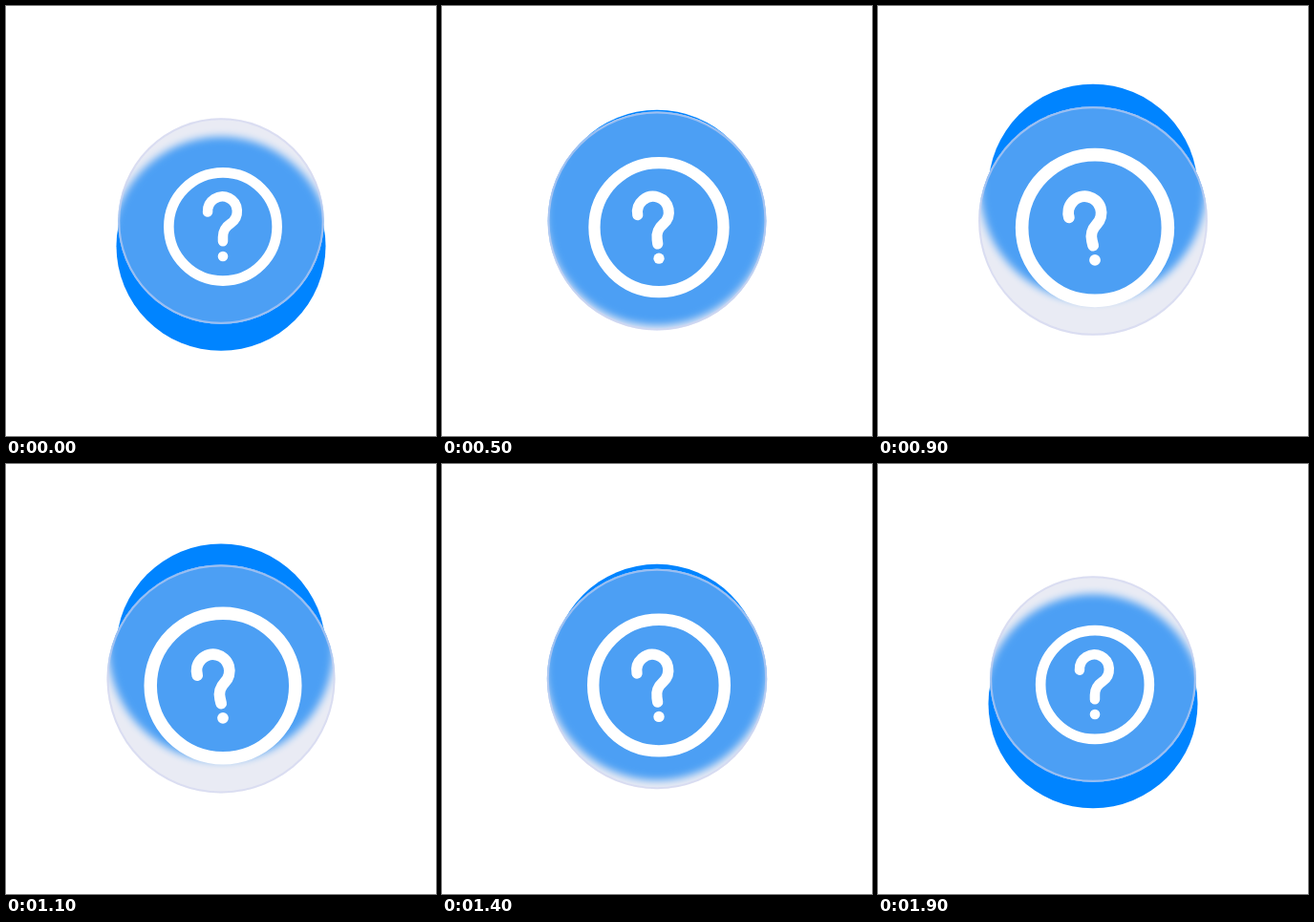
An HTML page that plays this animation: 450 by 450 pixels, repeating every 2000 ms.

```html
<!DOCTYPE html>
<html lang="en">
<head>
<meta charset="utf-8">
<title>Help button</title>
<style>
  html, body { margin: 0; width: 100%; height: 100%; overflow: hidden; background: #fff; }
  svg { display: block; width: 100vw; height: 100vh; }
</style>
</head>
<body>
<svg viewBox="0 0 450 450">
  <defs>
    <clipPath id="lens"><circle class="glass" cx="225" cy="225"/></clipPath>
    <filter id="soft" x="-20%" y="-20%" width="140%" height="140%" color-interpolation-filters="sRGB">
      <feGaussianBlur stdDeviation="4"/>
    </filter>
  </defs>
  <circle id="disc" cx="225" r="109.5" fill="#0084ff"/>
  <g clip-path="url(#lens)">
    <rect width="450" height="450" fill="#fff"/>
    <circle id="blurred" cx="225" fill="#0084ff" filter="url(#soft)"/>
    <rect width="450" height="450" fill="rgb(197,203,226)" fill-opacity=".385"/>
  </g>
  <circle id="rim" cx="225" cy="225" fill="none" stroke="rgb(208,212,240)" stroke-opacity=".6" stroke-width="2"/>
  <circle id="ring" cx="227" fill="none" stroke="#fff"/>
  <path id="hook" d="M-15.4 .8A15.4 15.4 0 1 1 8.5 12.8C3 16.5 .5 20 .5 27V31.5"
        fill="none" stroke="#fff" stroke-width="10.5" stroke-linecap="round" stroke-linejoin="round"/>
  <circle id="dot" cx="227" fill="#fff"/>
</svg>
<script>
const LOOP = 2000, STEP = 100, LEAD = 30;
const $ = id => document.getElementById(id);
const glass = document.querySelector('.glass');
const set = (el, attrs) => {
  for (const name in attrs) el.setAttribute(name, attrs[name]);
};

function draw(time) {
  const t = Math.floor((time % LOOP) / STEP) * STEP + LEAD;
  const p = (1 - Math.cos(2 * Math.PI * t / LOOP)) / 2;
  const mix = (a, b) => a + (b - a) * p;

  const discY = mix(251.5, 190.5);
  const glassR = mix(107.7, 120);
  const ringW = mix(10.6, 13.6);

  set($('disc'), { cy: discY });
  set($('blurred'), { cy: discY, r: mix(114.5, 118) });
  set(glass, { r: glassR });
  set($('rim'), { r: glassR - 1 });
  set($('ring'), { cy: mix(231, 232), r: mix(61.9, 83.4) - ringW / 2, 'stroke-width': ringW });
  set($('hook'), {
    transform: `translate(${mix(226.5, 216.3)} ${mix(214.8, 216.5)}) rotate(${mix(0, -13.5)}) scale(${mix(1, 1.12)})`
  });
  set($('dot'), { cy: mix(262, 266), r: mix(5.3, 5.9) });
}

const start = performance.now();
function tick() {
  draw(performance.now() - start);
  requestAnimationFrame(tick);
}
tick();
</script>
</body>
</html>
```
